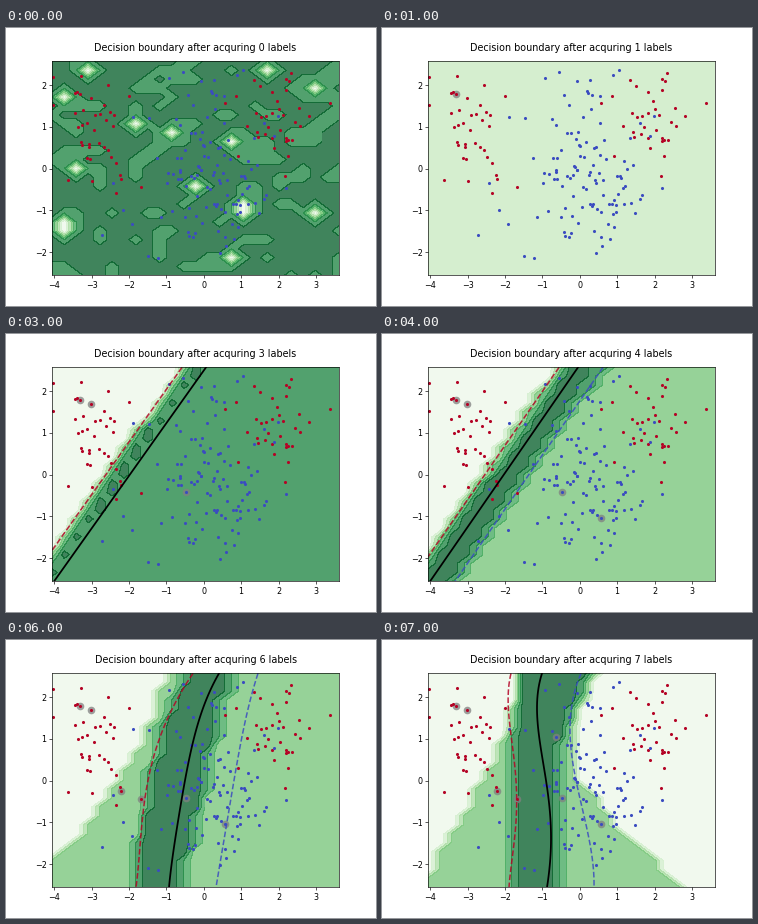
A matplotlib script for the animation above (8000 ms loop, 370 px wide and 278 px high).

```python
import numpy as np
import matplotlib.pyplot as plt
from matplotlib.animation import FuncAnimation

W, H, DPI = 370, 278, 57.8125
LEFT, RIGHT, TOP, BOTTOM = 46.25, 333.0, 33.36, 247.42
X0, Y0, X_UNIT, Y_UNIT = 197.75, 140.7, 37.4, 41.7

N = 25
MEMBERS = 10
LEVELS = np.arange(8) / 10
ALPHA = 0.75

RED, BLUE = plt.cm.coolwarm(1.0), plt.cm.coolwarm(0.0)
GREENS = plt.cm.Greens

gx = np.linspace(LEFT, RIGHT, N)
gy = np.linspace(TOP, BOTTOM, N)

# Points in the order they get labelled (stage pixels)
QUERIES = [(74, 66, RED), (84.5, 70, RED), (180, 158, BLUE), (219, 184, BLUE),
           (115, 151, RED), (134.5, 159, RED), (174, 97, BLUE)]

# Sample clusters: centre, spread, count, colour
CLUSTERS = [((84, 102), (24, 28), 36, RED),
            ((267, 92), (22, 27), 36, RED),
            ((203, 142), (36, 41), 115, BLUE)]

# Grid cells where the untrained committee happens to agree
AGREED = [(1, 4), (3, 1), (18, 1), (22, 3), (7, 7), (10, 8), (15, 9), (2, 12),
          (12, 14), (16, 16), (16, 17), (1, 18), (1, 19), (22, 17), (15, 22)]


def to_data(x, y):
    return (np.asarray(x) - X0) / X_UNIT, (Y0 - np.asarray(y)) / Y_UNIT


def vote_entropy(votes):
    """Entropy of a committee's red/blue split."""
    p = np.clip(votes / MEMBERS, 1e-9, 1 - 1e-9)
    return -p * np.log(p) - (1 - p) * np.log(1 - p)


def along(xs, y):
    """Smooth curve through xs, which are spread evenly from top to bottom."""
    keys = np.linspace(-1, 1, len(xs))
    t = 2 * (np.asarray(y) - TOP) / (BOTTOM - TOP) - 1
    return np.polyval(np.polyfit(keys, xs, len(xs) - 1), t)


def untrained():
    """Mostly split votes, with streaks and spots of agreement."""
    noise = np.random.default_rng(4).normal(size=(N, N))
    noise += np.roll(noise, 1, axis=1) + .5 * np.roll(noise, 1, axis=0)
    votes = np.where(noise > np.quantile(noise, .78), 2, 4)
    for i, j in AGREED:
        votes[max(j - 1, 0):j + 2, i] = np.minimum(votes[max(j - 1, 0):j + 2, i], 2)
        votes[j, i - 1:i + 2] = np.minimum(votes[j, i - 1:i + 2], 2)
    for i, j in AGREED:
        votes[j, i] = 0
    return vote_entropy(votes)


def committee(left, right):
    """Left edges raise the dissent by one, two, then four votes; right
    edges lower it again from four to two, one and none."""
    enter, leave = (1, 1, 2), (2, 1, 1)
    votes = np.zeros((N, N))
    for edges, steps, sign in ((left, enter, 1), (right, leave, -1)):
        for xs, step in zip(edges, steps):
            keys = np.linspace(TOP, BOTTOM, len(xs))
            edge = np.interp(gy, keys, xs)
            votes += sign * step * (gx[None, :] > edge[:, None])
    return vote_entropy(np.clip(votes, 0, 4))


def offset(line, *shifts):
    return [np.array(line) + dx for dx in shifts]


def parallel(line, left, right, red, blue=None):
    """Committee whose members all run alongside one boundary."""
    return (committee(offset(line, *left), offset(line, *right)), line,
            offset(line, red)[0],
            None if blue is None else offset(line, blue)[0])


# Labels acquired -> entropy, then the black, red and blue lines
MODELS = {
    0: (untrained(), None, None, None),
    3: parallel((200, 48), (-26, -20, -14), (-4,), -24),
    4: parallel((196, 48), (-24, -16, -10), (17, 30), -19, 25),
    5: parallel((205, 151, 105), (-42, -28, -20), (26, 38), -24, 33),
    6: (committee([(160, 140, 112, 72, 20), (174, 152, 138, 130, 128),
                   (184, 160, 148, 138, 135)],
                  [(222, 205, 196, 184, 168), (232, 218, 204, 192, 182)]),
        (213, 191, 179, 170, 163), (187, 158, 142, 135, 130),
        (252, 238, 228, 219, 210)),
    7: (committee([(136, 126, 98, 68, 36), (137, 130, 128, 127, 126),
                   (141, 141, 141, 141, 141)],
                  [(204, 180, 170, 169, 168), (209, 187, 183, 181, 180),
                   (214, 190, 198, 245, 302)]),
        (160, 156, 164, 169, 165), (129, 128, 134, 133, 127),
        (199, 188, 194, 206, 212)),
}


def sample():
    rng = np.random.default_rng(12)
    groups = []
    for centre, spread, count, color in CLUSTERS:
        xy = rng.normal(centre, spread, size=(count, 2))
        groups.append((*xy.T, color))
    return groups


SAMPLES = sample()

plt.rcParams["font.family"] = "DejaVu Sans"
fig = plt.figure(figsize=(W / DPI, H / DPI), dpi=DPI, facecolor="white")
ax = fig.add_axes([LEFT / W, 1 - BOTTOM / H, (RIGHT - LEFT) / W,
                   (BOTTOM - TOP) / H])


def line(xs, color, **style):
    if xs is not None:
        y = np.linspace(TOP, BOTTOM, 60)
        ax.plot(*to_data(along(xs, y), y), color=color, **style)


def dots(x, y, color, size=15, **style):
    ax.scatter(*to_data(x, y), s=size, color=color, linewidths=0, **style)


def background(labels):
    if labels not in MODELS:
        ax.axhspan(-3, 3, color=GREENS(.25), alpha=ALPHA, lw=0)
        return
    entropy, black, red, blue = MODELS[labels]
    shades = GREENS((np.arange(7) + .5) / 7)
    ax.contourf(*to_data(gx, gy), entropy, levels=LEVELS, colors=shades,
                alpha=ALPHA)
    line(red, RED, ls="--", lw=1.9, alpha=.85)
    line(blue, BLUE, ls="--", lw=1.9, alpha=.85)
    line(black, "black", lw=2.2)


def draw(labels):
    ax.clear()
    background(labels)
    for x, y, _ in QUERIES[:labels]:
        dots(x, y, "gray", 90, alpha=.75)
    for x, y, color in SAMPLES + QUERIES:
        dots(x, y, color)

    xlim, ylim = to_data([LEFT, RIGHT], [BOTTOM, TOP])
    ax.set(xlim=xlim, ylim=ylim, xticks=range(-4, 4), yticks=range(-2, 3))
    ax.set_title(f"Decision boundary after acquring {labels} labels",
                 fontsize=12, pad=13)


anim = FuncAnimation(fig, draw, frames=8, interval=1000, repeat=True,
                     repeat_delay=0, init_func=lambda: draw(0))
plt.show()
```
